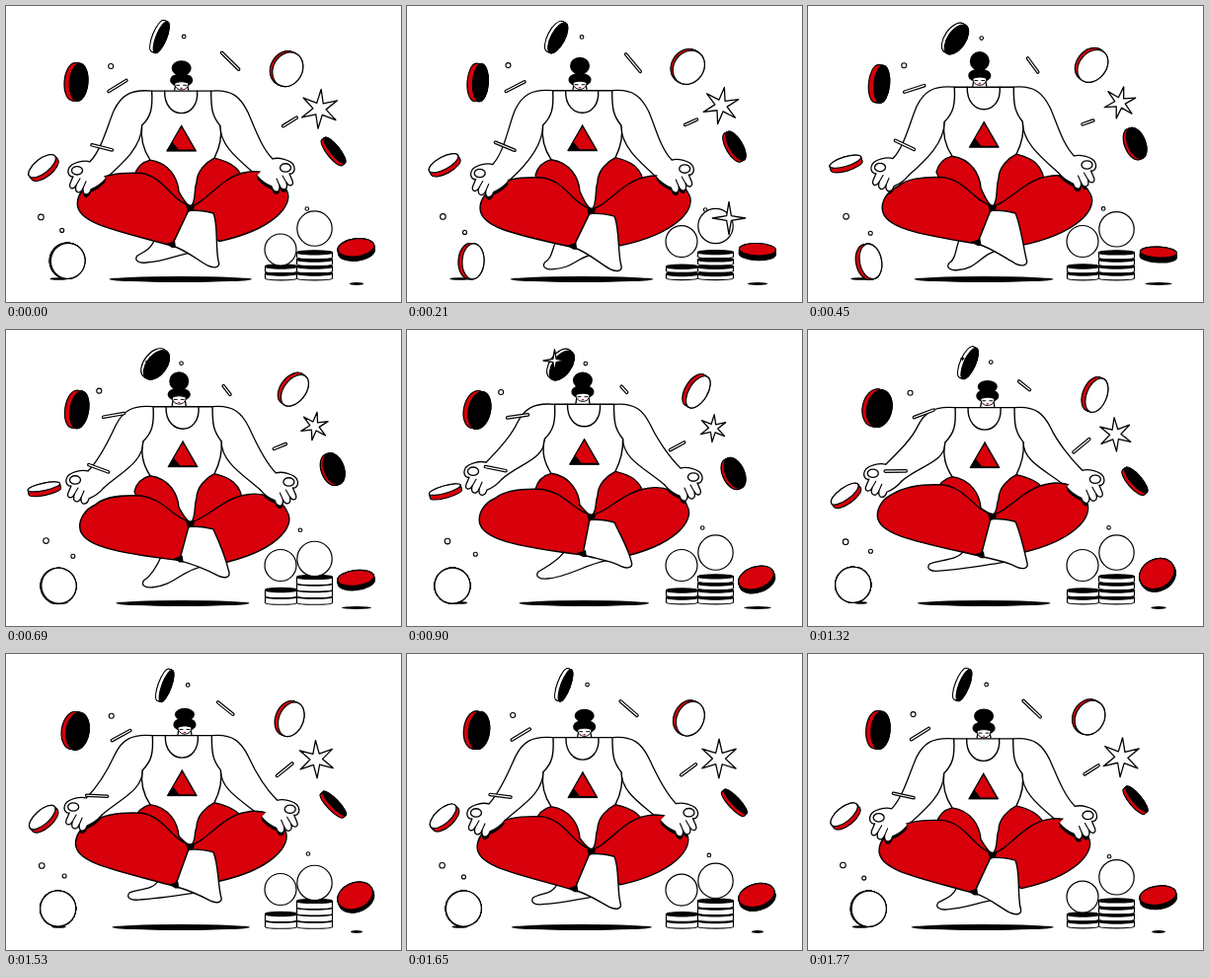
An HTML page with a canvas for the animation above (1.8 s loop, 400 px wide and 300 px high).

```html
<!DOCTYPE html>
<html lang="en">
<head>
<meta charset="utf-8">
<title>Floating meditation</title>
<style>
html, body { margin: 0; width: 100%; height: 100%; overflow: hidden; background: #fff; }
canvas { display: block; width: 400px; height: 300px; }
</style>
</head>
<body>
<canvas id="stage"></canvas>
<script>
const LOOP = 1800, STEP = 30;
const RED = '#d8000a', INK = '#000', WHITE = '#fff';
const canvas = document.getElementById('stage');
const g = canvas.getContext('2d');
const dpr = window.devicePixelRatio || 1;
canvas.width = 400 * dpr;
canvas.height = 300 * dpr;

let now = 0;

// --- motion rules ---

// Swings once per loop around mid, highest at the time peak
const wave = (mid, amp, peak) => mid + amp * Math.cos((now - peak) / LOOP * Math.PI * 2);

// Small elliptical orbit, furthest right at the time peak
const drift = (x, y, ax, ay, peak) => [wave(x, ax, peak), wave(y, ay, peak + LOOP / 4)];

// Soft pulse centred on a time
function pulse(mid, width) {
  const d = (now - mid + LOOP * 1.5) % LOOP - LOOP / 2;
  return Math.exp(-((d / width) ** 2));
}

// Two hops per loop, 0 on landing and 1 at the top
const hop = land => Math.abs(Math.sin((now - land) / LOOP * Math.PI * 2));

// --- drawing helpers ---

function paint(path, fill, width = 1.3) {
  if (fill) { g.fillStyle = fill; g.fill(path); }
  if (width) { g.lineWidth = width; g.strokeStyle = INK; g.stroke(path); }
}

function oval(x, y, rx, ry) {
  const p = new Path2D();
  p.ellipse(x, y, Math.max(rx, .3), Math.max(ry, .3), 0, 0, Math.PI * 2);
  return p;
}

// First pair is the start; 2 numbers make a line, 6 make a curve
function trace(start, ...parts) {
  const p = new Path2D();
  p.moveTo(...start);
  for (const s of parts) s.length === 2 ? p.lineTo(...s) : p.bezierCurveTo(...s);
  return p;
}

function coin([x, y], long, short, turn, depth, face, side) {
  const a = Math.min(short, long);
  const th = depth * Math.sqrt(1 - (a / long) ** 2);
  g.save();
  g.translate(x, y);
  g.rotate(turn * Math.PI / 180);
  for (const [grow, color] of [[.6, INK], [-.6, side]]) {
    for (let i = 0; i <= 8; i++) paint(oval(th * (i / 8 - .5), 0, a + grow, long + grow), color, 0);
  }
  paint(oval(-th / 2, 0, a, long), face, 1.2);
  g.restore();
}

function stick([x, y], half, turn) {
  const a = turn * Math.PI / 180, dx = half * Math.cos(a), dy = half * Math.sin(a);
  const line = trace([x - dx, y - dy], [x + dx, y + dy]);
  paint(line, null, 3.6);
  g.lineWidth = 1.2;
  g.strokeStyle = WHITE;
  g.stroke(line);
}

function star([x, y], points, outer, inner, turn = 0) {
  const p = new Path2D();
  for (let i = 0; i < points * 2; i++) {
    const r = i % 2 ? inner : outer, a = turn - Math.PI / 2 + i * Math.PI / points;
    p.lineTo(x + r * Math.cos(a), y + r * Math.sin(a));
  }
  p.closePath();
  paint(p, WHITE, 1.3);
}

function flash(from, to, x, y, size) {
  const u = (now - from) / (to - from);
  if (u <= 0 || u >= 1) return;
  const r = size * Math.sin(Math.PI * u);
  star([x, y], 4, r, r * .2);
}

// Pile of coins whose black tops show as it spreads from 0 to 1
function pile(x, n, rx, spread) {
  const gap = 6.5 + .8 * spread, h = 6.5 - 2.2 * spread;
  for (let i = 0; i < n; i++) {
    const y = 270 + 1.5 * spread - i * gap, low = y + h + 2.4;
    paint(trace([x - rx, y], [x - rx, y + h], [x - rx, low, x + rx, low, x + rx, y + h], [x + rx, y]), WHITE, 1.2);
    paint(oval(x, y, rx, 2.1), INK, 1.2);
  }
}

// --- figure ---

function handPath([x, y], s) {
  const q = (...v) => v.map((n, i) => i % 2 ? y + n : x + s * n);
  return trace(q(12, -10), q(6, -12, -6, -9, -9, -4), q(-12, 2, -8, 6, -5, 5),
    q(-8, 12), q(-10, 17, -5, 19, -2, 14), q(-4, 21, 2, 24, 5, 17),
    q(4, 25, 11, 25, 13, 18), q(18, 16, 24, 12, 28, 7));
}

function hand(h, s) {
  const [x, y] = h;
  paint(handPath(h, s), WHITE);
  paint(oval(x - s, y - 1, 5.5, 4.2), WHITE);
  paint(trace([x - s * 2, y + 14], [x + s * 2, y + 7]), null, 1.1);
  paint(trace([x + s * 5, y + 17], [x + s * 8, y + 10]), null, 1.1);
}

function arm([sx, sy], [mx, my], [px, py], [hx, hy], s) {
  const upper = [sx - s * 22, sy - 2, mx + s * 7, my - 14, mx, my];
  const fore = [mx - s * 6, my + 13, hx + s * 24, hy - 22, hx + s * 12, hy - 10];
  const wrist = [hx + s * 28, hy + 7];
  const under = [hx + s * 46, hy - 9, px, py + 21, px, py];
  paint(trace([sx, sy], upper, fore, wrist, under), WHITE, 0);
  paint(trace([sx, sy], upper, fore));
  paint(trace(wrist, under));
}

function head(base) {
  const x = wave(177.8, 4, 1340), y = wave(70, 6.5, 70);
  const sides = [[x - 6, y + 4], [x - 7, base], [x + 7, base], [x + 6, y + 4]];
  paint(trace(...sides), WHITE, 0);
  paint(trace(sides[0], sides[1]));
  paint(trace(sides[2], sides[3]));
  paint(oval(x, wave(57, 6, 1750), 10, wave(8.2, 1.8, 520)), INK, 0);
  paint(oval(x, y - 1, 11.5, 7), INK, 0);
  paint(trace([x - 7, y + 2], [x - 3, y, x + 3, y, x + 7, y + 2],
    [x + 7, y + 11, x - 7, y + 11, x - 7, y + 2]), WHITE, 1);
  for (const s of [-1, 1]) paint(trace([x + s * 2, y + 4], [x + s * 5, y + 4]), null, 1);
  paint(oval(x, y + 7, 1.3, .7), RED, 0);
}

function figure() {
  const lift = wave(-6.3, 5.6, 78), sway = wave(.6, 1, 1000), sink = wave(-5.5, 9.1, 320);
  const shift = (dx, dy) => (...v) => v.map((n, i) => n + (i % 2 ? dy : dx));
  const up = shift(sway, lift), waist = shift(0, lift), leg = shift(0, sink);

  const kneeL = wave(72.7, 2.5, 500), kneeR = wave(287, 2, 430);
  const cx = 186, cy = wave(195.5, 10.6, 225);
  const qx = wave(173, 5.2, 985), qy = wave(235.5, 9.3, 180);
  const fx = wave(221, 6, 900), fy = wave(249, 15.6, 200);
  const tx = wave(132, 10, 450), ty = wave(251, 12.2, 354);
  const handL = [wave(70.5, 4.3, 272), wave(156, 14.6, 180)];
  const handR = [wave(285.5, 5.3, 1145), wave(157.5, 8.7, 155)];

  arm(up(148, 87), up(110, 106), up(138, 122), handL, 1);
  arm(up(208, 87), up(245, 108), up(217, 122), handR, -1);

  // back foot
  paint(trace([qx - 18, qy - 5], [qx - 22, qy + 4, tx + 8, ty - 6, tx + 1, ty - 2],
    [tx - 3, ty + 3, tx + 3, ty + 6, tx + 10, ty + 5],
    [tx + 30, ty + 4, qx + 4, qy + 9, qx + 24, qy + 6], [qx + 20, qy - 8]), WHITE);

  // hips
  paint(trace(waist(146, 157), waist(138, 159, 132, 165, 130, 173), leg(137, 182), [cx, cy + 2],
    leg(240, 182), waist(240, 164, 224, 158, 211, 155)), RED);

  // top
  paint(trace(up(148, 87), up(149, 105, 147, 113, 138, 122), waist(136, 135, 140, 148, 146, 157),
    [166, 160 + lift, 174, 176 + lift, 175, 189 + lift], [cx - 4, cy - 2, cx, cy, cx + 1, cy],
    [cx + 7, cy - 4, 190, 186 + lift, 193, 180 + lift], waist(193, 168, 203, 159, 211, 155),
    waist(216, 145, 219, 132, 217 + sway, 122),
    up(209, 112, 208, 105, 208, 87), up(148, 87)), WHITE, 1.4);
  paint(trace(up(161, 87), up(160, 117, 196, 117, 194, 87)), null, 1.4);

  // chest triangle
  paint(trace(up(178, 122), up(193, 148), up(163, 148), up(178, 122)), INK, 1);
  paint(trace(up(178, 124), up(191, 146.5), up(175, 146.5), up(169, 139)), RED, 0);

  head(86 + lift);

  // legs, darkened under the hands
  const right = trace([cx, cy], [cx + 16, cy - 2, 218, 174 + sink, 243, 170 + sink],
    leg(258, 167, 279, 172, kneeR - 3, 188),
    [kneeR + 5, 203 + sink, kneeR - 16, 228 + sink, 216, 240 + sink], [cx - 2, cy + 12], [cx, cy]);
  const left = trace([cx + 1, cy], [cx - 18, cy - 5, 160, 174 + sink, 137, 171 + sink],
    leg(116, 170, 98, 173, kneeL + 16, 180),
    leg(kneeL + 5, 185, kneeL, 194, kneeL, 202),
    [kneeL, 222 + sink, 112, 229 + sink, qx, qy], [cx + 1, cy]);
  for (const [shape, h, s] of [[right, handR, -1], [left, handL, 1]]) {
    paint(shape, RED, 1.4);
    g.save();
    g.clip(shape);
    g.translate(0, 3);
    paint(handPath(h, s), INK, 0);
    g.restore();
  }

  // front foot and cuff folds
  paint(trace([cx - 1, cy + 4], [cx + 8, cy + 4, cx + 18, cy + 5, cx + 24, cy + 7],
    [cx + 29, cy + 18, fx - 3, fy - 16, fx, fy - 3],
    [fx + 3, fy + 5, fx - 5, fy + 5, fx - 11, fy + 2],
    [fx - 22, fy - 4, qx + 14, qy + 4, qx, qy], [cx - 1, cy + 4]), WHITE, 1.4);
  paint(trace([cx - 4, cy - 2], [cx + 5, cy - 1], [cx + 4, cy + 4], [cx - 2, cy + 6]), INK, 0);
  paint(trace([qx - 6, qy - 2], [qx + 3, qy - 5], [qx + 4, qy + 2], [qx, qy + 2]), INK, 0);

  hand(handL, 1);
  hand(handR, -1);
}

// --- scene ---

function shadows() {
  paint(oval(wave(178, 1.3, 900), 277, wave(69, 3.5, 120), 3), INK, 0);
  paint(oval(53.5, 276.5, wave(8.5, 2, 350), 1.3), INK, 0);
  paint(oval(355, 281.5, wave(10.5, 4.5, 680), 1.5), INK, 0);
}

function dot([x, y], r) {
  paint(oval(x, y, r, r), WHITE, 1.1);
}

function dots() {
  dot(drift(100.7, 62, 6.5, -2, 1640), 2.5);
  dot(drift(180.5, 32.5, 4.8, -1.6, 1330), 1.8);
  dot(drift(38.2, 214, 2.8, .7, 860), 2.8);
  dot(drift(63, 227.3, 6.3, -3, 890), 2);
  dot(drift(302, 203, 4, 3.5, 1570), 1.8);
}

function sticks() {
  stick(drift(112.5, 84.2, 4.8, -3.2, 1375), 10.5, wave(-20, 12, 850));
  stick(drift(223.5, 58, 5.5, 3, 245), wave(8, 4, 50), wave(46, 8, 500));
  stick(drift(93.5, 142, 5.8, -1.8, 250), 10.5, wave(12.5, 13, 420));
  stick(drift(280.5, 117.6, 7.5, .4, 115), wave(8, 2.3, 1350), wave(-30, 10, 500));
}

function piles() {
  const height = hop(660);
  pile(278.5, 2, 16, height);
  pile(312.5, 4, 18, height);
  paint(oval(278, 238.5 + 8.5 * pulse(0, 90), 16, 16), WHITE, 1.2);
  paint(oval(312.5, 233 - 10 * height, 17.7, 17.7), WHITE, 1.2);
}

function coins() {
  coin(drift(155.5, 33, 6.5, -2, 1350), 17, wave(7.3, 2.6, 700), wave(29, 9, 700), -4, INK, WHITE);
  coin(drift(71, 79, 1, 2, 450), 19, wave(10.2, 2.5, 1245), wave(8.5, 5, 1100), -6, INK, RED);
  coin(drift(288.5, 62.7, 4.7, 3, 990), 18, wave(12, 3.1, 150), wave(30, 9, 500), -5, WHITE, RED);
  coin(drift(331, 146.5, -.5, 7, 940), 16.5, wave(7, 3, 700), wave(-32, 12, 620), -4, INK, RED);
  coin(drift(38.5, 164, .5, 4, 900), 16.5, wave(5.5, 1.9, 1680), wave(63, 15, 690), 5, WHITE, RED);
  coin(drift(54, 258.7, 11, .7, 215), 18, 18 - 10 * pulse(330, 200), wave(-8, 18, 1750), -5, WHITE, RED);
  coin(drift(354.4, 250, .5, 3.6, 280), 18.5, wave(10, 4.6, 1288), wave(77, 17, 350), 5, RED, INK);
}

function draw() {
  g.setTransform(dpr, 0, 0, dpr, 0, 0);
  g.fillStyle = WHITE;
  g.fillRect(0, 0, 400, 300);
  g.lineJoin = g.lineCap = 'round';
  shadows();
  dots();
  figure();
  sticks();
  piles();
  coins();
  const size = wave(17, 3, 1750);
  star(drift(313.8, 102, 4.3, -4.7, 150), 6, size, size * .33, wave(.08, .15, 450));
  flash(60, 400, 326, 215, 17);
  flash(600, 1350, 146 + (now - 690) / 60, 32 - (now - 690) / 210, 12);
}

const begin = performance.now();
function tick(ms) {
  now = Math.floor(Math.max(0, ms - begin) % LOOP / STEP) * STEP;
  draw();
  requestAnimationFrame(tick);
}
tick(begin);
</script>
</body>
</html>
```
